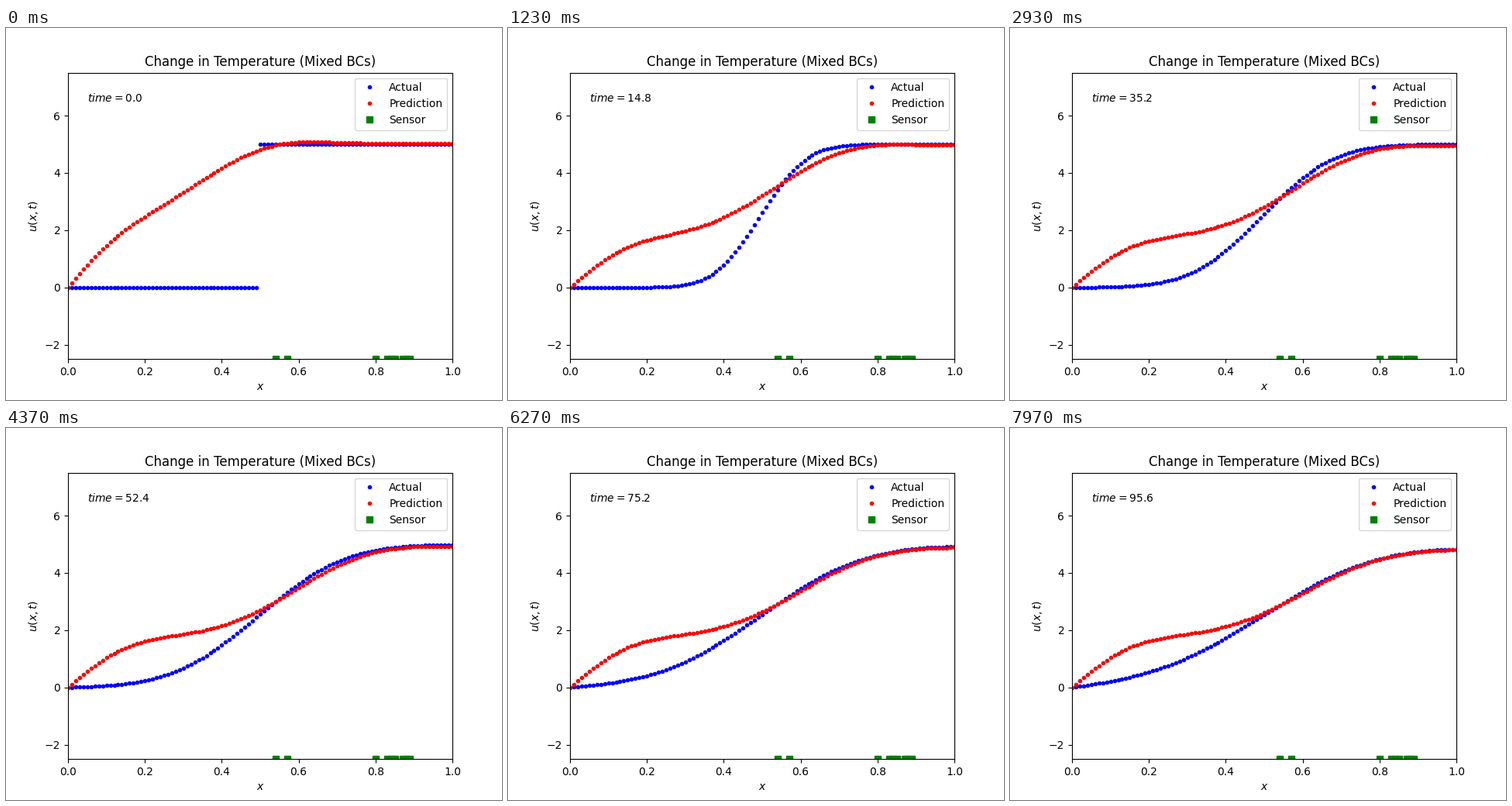
Animation of 640x480 px, one loop 8000 ms. Source, as a matplotlib script:

```python
import math

import numpy as np
import matplotlib.pyplot as plt
from matplotlib.animation import FuncAnimation

STEPS = 240       # simulated states in one loop
DT = 0.4          # simulated time per state
SUBSTEPS = 4
ALPHA = 3e-4      # diffusivity
N = 101
INTERVAL = 20     # ms per drawn frame
FRAMES = 8000 // INTERVAL

erf = np.vectorize(math.erf)
x = np.linspace(0, 1, N)
sensors = np.array([54, 57, 80, 83, 84, 85, 87, 88, 89])


def simulate():
    """Explicit heat equation: u = 0 on the left, no flux on the right."""
    r = ALPHA * DT / SUBSTEPS / (x[1] - x[0]) ** 2
    u = np.where(np.arange(N) >= N // 2, 5.0, 0.0)
    rows = [u.copy()]
    for _ in range(STEPS - 1):
        for _ in range(SUBSTEPS):
            u[1:-1] += r * (u[2:] - 2 * u[1:-1] + u[:-2])
            u[-1] = u[-2]
        rows.append(u.copy())
    return np.array(rows)


def estimate(u):
    """Shoulder on the left, a smooth step, and a small bump at its top.

    The step is pushed right as the two sensors nearest the jump cool down.
    """
    near = u[:, sensors[:2]].mean(axis=1)
    heat = ((near - near[-1]) / (near[0] - near[-1]))[:, None]   # 1 -> 0
    tau = np.linspace(0, 1, STEPS)[:, None]                      # 0 -> 1

    shoulder = 1.78 * erf(x / (0.175 - 0.03 * heat ** 3))

    center = 0.603 - 0.22 * heat - 0.073 * heat ** 2
    width = 0.196 + 0.024 * heat + 0.042 * tau
    height = 3.17 + 0.08 * heat ** 2 - 0.11 * tau ** 3
    step = height / 2 * (erf((x - center) / width) + erf((x + center) / width))

    bump = 0.12 * (1 - tau) + 0.04 * heat
    return shoulder + step + bump * np.exp(-((x - center - 0.24) / 0.14) ** 2)


actual = simulate()
predicted = estimate(actual)

fig, ax = plt.subplots(figsize=(6.4, 4.8), dpi=100)
ax.set_xlim(0, 1)
ax.set_ylim(-2.5, 7.5)
ax.set_title("Change in Temperature (Mixed BCs)")
ax.set_xlabel("$x$")
ax.set_ylabel("$u(x,t)$")

actual_dots, = ax.plot(x, actual[0], "b.", label="Actual")
predicted_dots, = ax.plot(x, predicted[0], "r.", label="Prediction")
ax.plot(x[sensors], np.full(len(sensors), -2.5), "gs", label="Sensor")
clock = ax.text(0.05, 0.9, "", transform=ax.transAxes)
ax.legend(loc="upper right")


def update(frame):
    k = (6 * frame + 4) // 10   # 30 states per second on a 20 ms grid
    actual_dots.set_ydata(actual[k])
    predicted_dots.set_ydata(predicted[k])
    clock.set_text(f"$time={k * DT:.1f}$")
    return actual_dots, predicted_dots, clock


anim = FuncAnimation(fig, update, frames=FRAMES, interval=INTERVAL,
                     repeat=True, repeat_delay=0)
plt.show()
```
